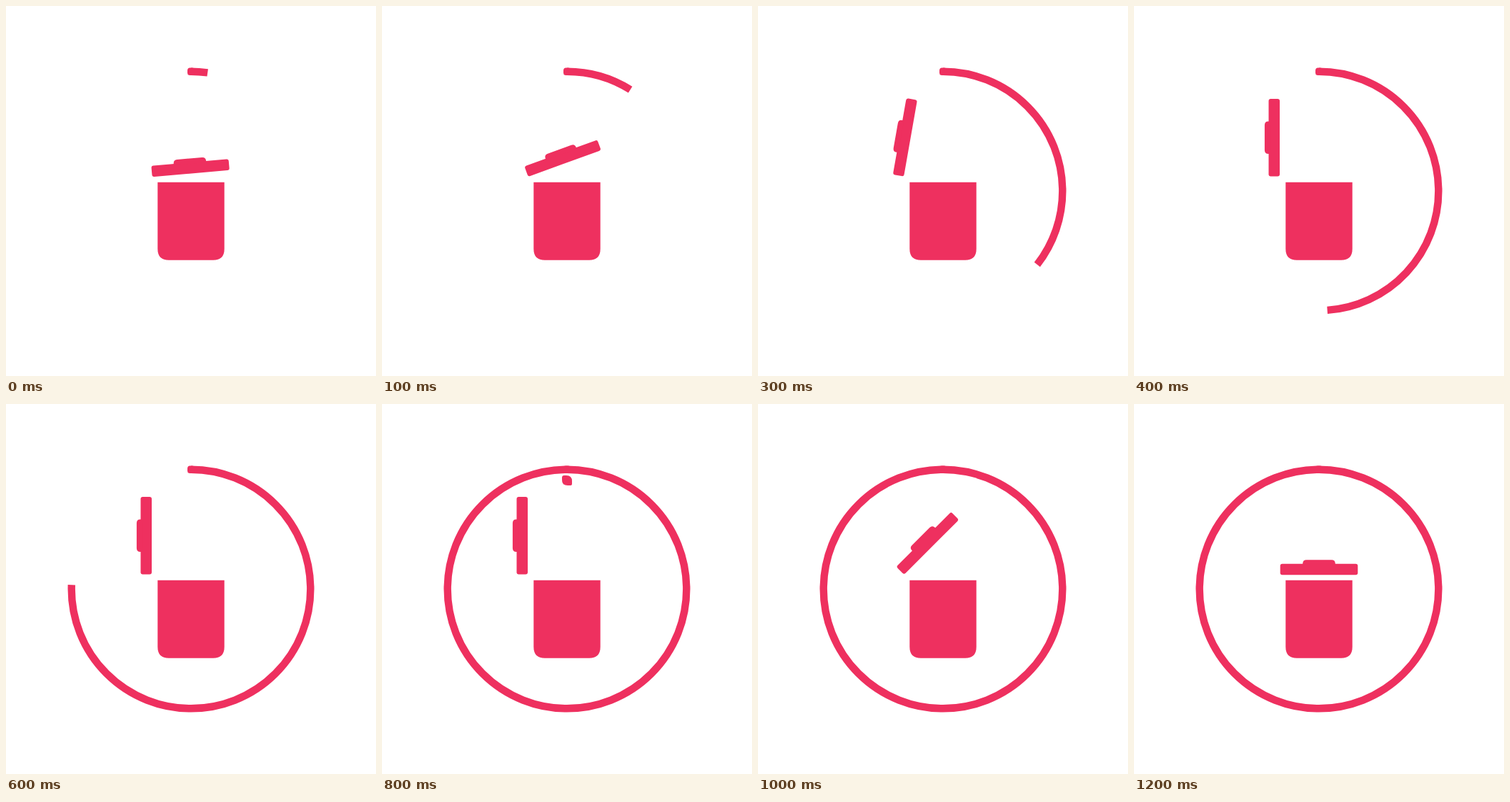
These frames come from a looping animation (518 by 518 pixels, 1300 ms). An HTML page:

```html
<!DOCTYPE html>
<html lang="en">
<head>
<meta charset="utf-8">
<title>Bin</title>
<style>
  html, body { margin: 0; width: 100%; height: 100%; overflow: hidden; background: #fff; }
  svg { display: block; width: 100%; height: 100%; fill: #ee305f; }
  #ring { fill: none; stroke: #ee305f; stroke-width: 10.4; }
</style>
</head>
<body>
<svg viewBox="0 0 518 518">
  <circle id="ring" cx="259" cy="259" r="167.3" pathLength="360" transform="rotate(-90 259 259)"/>
  <rect id="cap" x="254" y="86.5" width="10" height="10.4" rx="3.5"/>
  <path id="drop" d="M-4 -7H-1Q7 -7 7 1V5Q7 7 5 7H1Q-7 7 -7 -1V-4Q-7 -7 -4 -7Z"/>
  <path d="M212.3 246.8H305.7V340Q305.7 355.8 290 355.8H228Q212.3 355.8 212.3 340Z"/>
  <g id="lid">
    <rect x="204.7" y="223.8" width="108.6" height="15.5" rx="3"/>
    <path d="M236.2 226V223.5Q236.2 218.2 241.5 218.2H276.5Q281.8 218.2 281.8 223.5V226Z"/>
  </g>
</svg>
<script>
  const LOOP = 1300, STEP = 100;
  const RING_SPEED = 8, LID_SPEED = 5, FALL_SPEED = 16; // per tick, six ticks a step
  const RING_DONE = 45, CLOSE_AT = 49, LAND_AT = 55;
  const get = id => document.getElementById(id);
  const ring = get("ring"), drop = get("drop"), lid = get("lid");
  const clamp = (v, max) => Math.max(0, Math.min(max, v));

  function draw(time) {
    const step = Math.floor((time % LOOP) / STEP);
    const tick = Math.max(1, step * 6 - 2);

    ring.setAttribute("stroke-dasharray",
      tick >= RING_DONE ? "none" : `${tick * RING_SPEED} 360`);

    const opened = clamp(tick * LID_SPEED, 90);
    const closed = clamp((tick - CLOSE_AT) * LID_SPEED, 90);
    lid.setAttribute("transform", `rotate(${closed - opened} 204 239.3)`);

    const falling = tick >= RING_DONE && tick < LAND_AT;
    drop.setAttribute("visibility", falling ? "visible" : "hidden");
    drop.setAttribute("transform",
      `translate(259 ${91 + (tick - RING_DONE) * FALL_SPEED})`);
  }

  const start = performance.now();
  function loop() {
    draw(performance.now() - start);
    requestAnimationFrame(loop);
  }
  loop();
</script>
</body>
</html>
```
